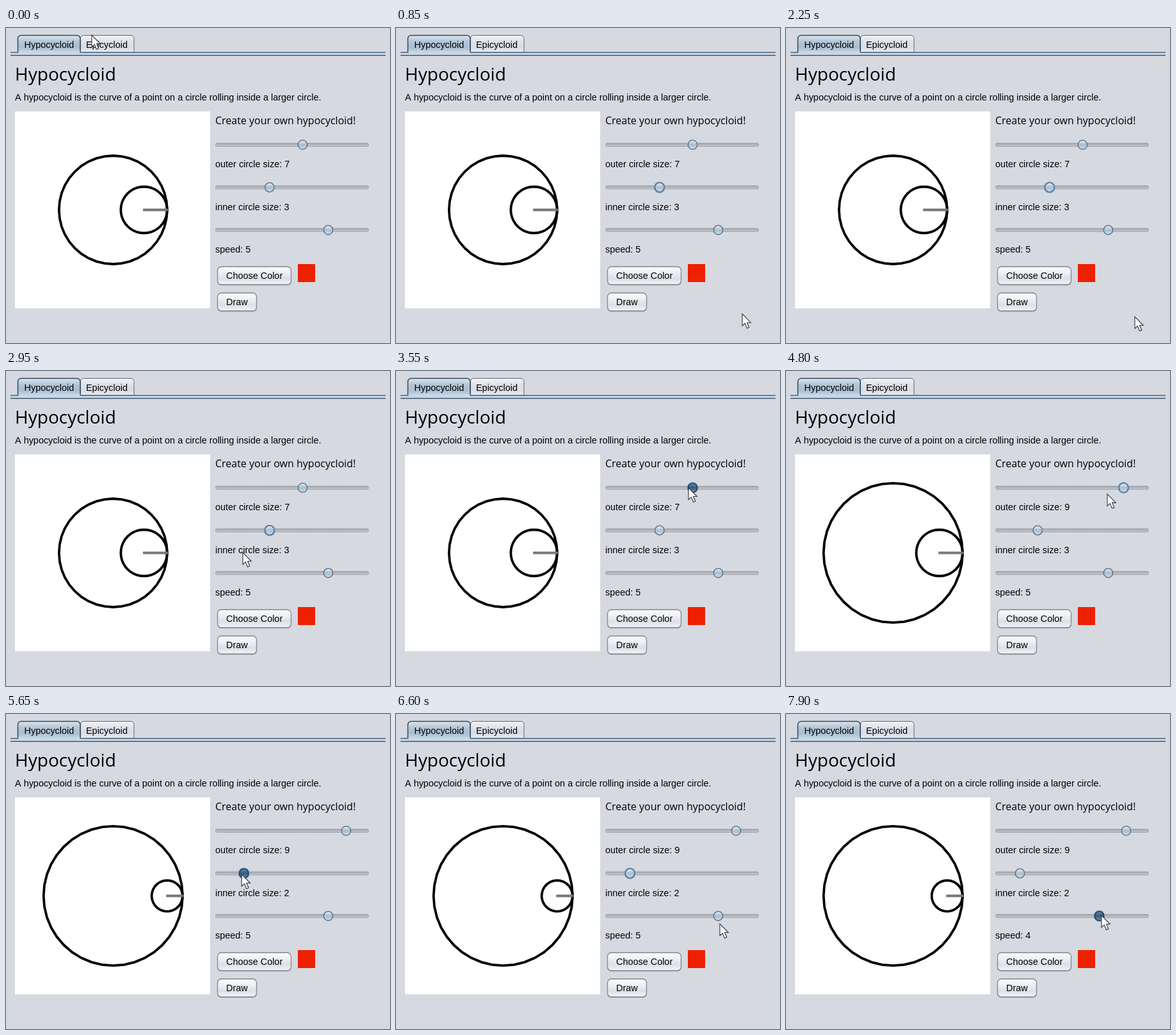
These frames come from a looping animation (600 px wide and 491 px high, 8 s). An HTML page with a canvas:

```html
<!DOCTYPE html>
<html lang="en">
<head>
<meta charset="utf-8">
<title>Hypocycloid</title>
<style>
html, body { margin: 0; width: 100%; height: 100%; overflow: hidden; background: #d6d9df; }
canvas { display: block; }
</style>
</head>
<body>
<canvas id="stage" width="600" height="491"></canvas>
<script>
const c = document.getElementById('stage').getContext('2d');
const LOOP = 8000, UNIT = 12.07, CX = 167.3, CY = 283.5;
const SANS = '14.43px "Liberation Sans", Arial, sans-serif';
const humanist = size => size + 'px "Open Sans", "Noto Sans", sans-serif';
const clamp = (v, lo, hi) => Math.max(lo, Math.min(hi, v));

// Places the pointer reaches: arrival time, x, y
const stops = [
  [0, 134, 11], [900, 545, 450], [2950, 370, 283],
  [3450, 457, 182], [4000, 481, 182], [4600, 521, 182],
  [5130, 390, 250], [5750, 362, 250],
  [6600, 506, 327], [6950, 507, 314], [7700, 493, 314]
];

// Each move eases, and lasts longer over a greater distance
function pointerAt(t) {
  let [, x, y] = stops[0];
  for (const [end, nx, ny] of stops.slice(1)) {
    const span = 300 + 0.9 * Math.hypot(nx - x, ny - y);
    const p = clamp((t - end + span) / span, 0, 1);
    const e = p * p * (3 - 2 * p);
    x += (nx - x) * e;
    y += (ny - y) * e;
    if (p < 1) break;
  }
  return [x, y];
}

function stateAt(t) {
  const [x, y] = pointerAt(t);
  const active = t < 400 ? -1 : t < 3500 ? 1 : t < 5250 ? 0 : t < 7000 ? 1 : 2;
  const dragX = t < 3500 ? 463 : pointerAt(Math.min(t, 4600))[0] + 6;
  const outer = Math.round(7 + (dragX - 463) / 32);
  const innerX = t < 5250 ? 337 + 223 * 2 / (outer - 1) : pointerAt(Math.min(t, 5850))[0] + 3;
  const speedX = t < 7000 ? 503 : x - 4;
  return {
    x, y, outer, active,
    thumbs: [t < 5250 ? dragX : 531, innerX, speedX],
    inner: innerX < 379 ? 2 : 3,
    speed: speedX < 496 ? 4 : 5,
    pressed: t >= 3500 && t < 4600 || t >= 5250 && t < 5850 || t >= 7000
  };
}

function text(str, x, y, font = SANS) {
  c.font = font;
  c.fillStyle = '#000';
  c.fillText(str, x, y);
}

function rect(x, y, w, h, color) {
  c.fillStyle = color;
  c.fillRect(x, y, w, h);
}

function gradient(y0, y1, ...colors) {
  const g = c.createLinearGradient(0, y0, 0, y1);
  colors.forEach((color, i) => g.addColorStop(i / (colors.length - 1), color));
  return g;
}

function box(x, y, w, h, radius, fill, stroke, width = 1) {
  c.beginPath();
  c.roundRect(x, y, w, h, radius);
  c.fillStyle = fill;
  c.fill();
  if (!stroke) return;
  c.strokeStyle = stroke;
  c.lineWidth = width;
  c.stroke();
}

function disc(x, y, r, fill, stroke, width) {
  box(x - r, y - r, 2 * r, 2 * r, r, fill, stroke, width);
}

function tabs() {
  const round = [5, 5, 0, 0];
  box(116.5, 11.5, 83.5, 26.5, round, gradient(12, 38, '#f3f4f7', '#dfe2e8', '#d8dce3', '#e8ebf0'), '#5d6675');
  box(18.5, 11.5, 97.5, 28, round, gradient(12, 39, '#dbe4ed', '#b4c5d6', '#aabed1', '#c6d6e5'), '#34485f', 1.5);
  rect(7, 37.5, 586, 5, '#cbd8e4');
  rect(7, 37.5, 586, 1.2, '#2b4a68');
  rect(7, 42, 586, 1.3, '#2b4a68');
  rect(19.5, 36, 96, 3, '#c6d6e5');
  text('Hypocycloid', 28.5, 30.5);
  text('Epicycloid', 125, 30.5);
}

function button(label, x, y, w) {
  box(x, y + 1.5, w, 28, 6, '#b3b6bd');
  box(x + .5, y, w - 1, 28, 6, gradient(y, y + 28, '#fbfbfc', '#eef0f3', '#dcdfe5', '#f3f5f8'), '#83878f', 1.3);
  text(label, x + 14, y + 19);
}

function slider(x, y, focused, pressed) {
  box(327.5, y - 2.5, 239, 5, 2.5, gradient(y - 3, y + 3, '#999ca3', '#b6b9bf', '#c6c9ce'), '#a0a3aa');
  if (focused) disc(x, y, 9, '#75a2ca');
  const colors = pressed ? ['#6f8fac', '#365a7c', '#7598b8'] : ['#eef3f8', '#aabed1', '#cfdeea'];
  disc(x, y, 7.2, gradient(y - 8, y + 8, ...colors), pressed ? '#17324d' : '#53697f', 1.3);
}

function ring(x, r) {
  c.beginPath();
  for (let i = 0; i < 40; i++) {
    const a = i * Math.PI / 20;
    c.lineTo(x + r * Math.cos(a), CY + r * Math.sin(a));
  }
  c.closePath();
  c.strokeStyle = '#000';
  c.lineWidth = 3.8;
  c.stroke();
}

function pointer(x, y) {
  c.fillStyle = '#fff';
  c.strokeStyle = '#30343c';
  c.lineWidth = 1.1;
  const arrow = new Path2D('M0 0V18.5L4.3 14.6L7.5 22.3L10.8 21L7.6 13.5H13.3Z');
  c.save();
  c.translate(x, y);
  c.fill(arrow);
  c.stroke(arrow);
  c.restore();
}

function draw(t) {
  const s = stateAt(t);
  rect(0, 0, 600, 491, '#d6d9df');
  tabs();
  text('Hypocycloid', 14, 82, humanist(28));
  text('A hypocycloid is the curve of a point on a circle rolling inside a larger circle.', 14, 112.5);

  rect(14, 130, 305, 307, '#fff');
  const R = s.outer * UNIT, r = s.inner * UNIT;
  ring(CX, R);
  ring(CX + R - r, r);
  rect(CX + R - r - 1.5, CY - 2, r + 3, 4, '#777');

  text('Create your own hypocycloid!', 327, 150, humanist(16));
  const labels = ['outer circle size: ' + s.outer, 'inner circle size: ' + s.inner, 'speed: ' + s.speed];
  labels.forEach((label, i) => {
    const y = 182 + 66.4 * i, active = s.active === i;
    slider(s.thumbs[i] + .5, y, active, active && s.pressed);
    text(label, 327, y + 35.2);
  });

  button('Choose Color', 330, 372, 116);
  rect(456, 368, 27, 28, '#ed2000');
  button('Draw', 330, 413, 62);
  pointer(s.x, s.y);
}

function frame() {
  draw(performance.now() % LOOP);
  requestAnimationFrame(frame);
}
frame();
</script>
</body>
</html>
```
